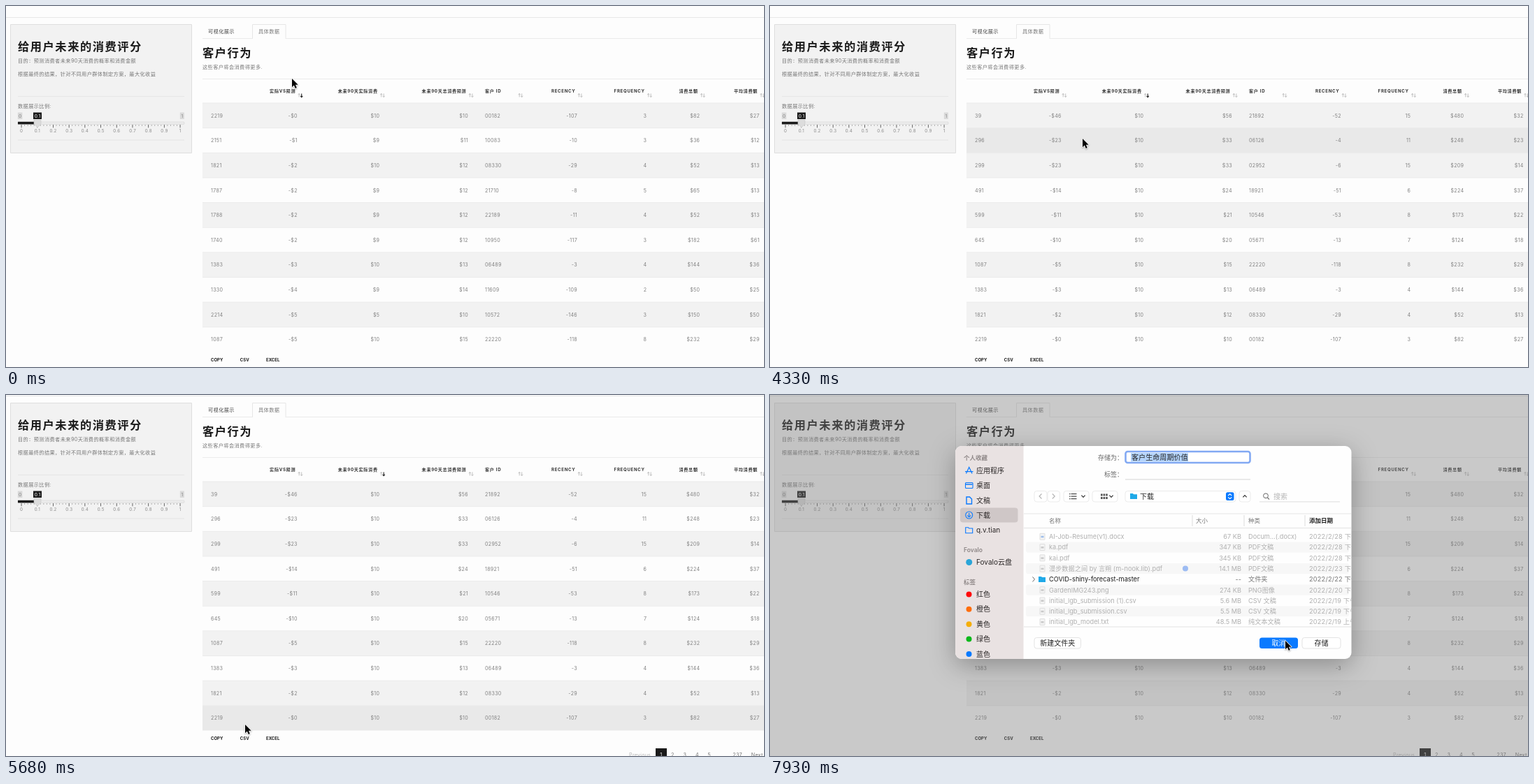
Write an HTML page with a canvas that moves like this. It is 1084 px wide and 517 px high and loops after 8000 ms.

```html
<!DOCTYPE html>
<html lang="zh-CN">
<head>
<meta charset="utf-8">
<title>客户行为</title>
<style>
html, body { margin: 0; width: 100%; height: 100%; overflow: hidden; background: #fdfdfd; }
canvas { display: block; width: 1084px; height: 517px; }
</style>
</head>
<body>
<canvas id="stage"></canvas>
<script>
const W = 1084, H = 517, LOOP = 8000;
const FONT = 'Inter, "Noto Sans CJK SC", "Noto Sans CJK", sans-serif';
const ratio = window.devicePixelRatio || 1;
const setup = c => {
  c.width = W * ratio;
  c.height = H * ratio;
  const x = c.getContext('2d');
  x.scale(ratio, ratio);
  return x;
};
const stage = document.getElementById('stage');
const layer = document.createElement('canvas');
const page = setup(stage), sheet = setup(layer);
let g = page;

// ---------- helpers ----------
function text(s, x, y, size, color, { w = 400, ls = 0, a = 'left' } = {}) {
  g.font = `${w} ${size}px ${FONT}`;
  g.letterSpacing = ls + 'px';
  g.textAlign = a;
  g.fillStyle = color;
  g.fillText(s, x + (a === 'right' ? ls : a === 'center' ? ls / 2 : 0), y + size * 0.36);
}
function rect(x, y, w, h, color) {
  g.fillStyle = color;
  g.fillRect(x, y, w, h);
}
function box(x, y, w, h, r, fill, stroke, lw = 1) {
  g.beginPath();
  g.roundRect(x, y, w, h, r);
  if (fill) { g.fillStyle = fill; g.fill(); }
  if (stroke) { g.strokeStyle = stroke; g.lineWidth = lw; g.stroke(); }
}
function line(color, lw, ...p) {
  g.beginPath();
  for (let i = 0; i < p.length; i += 2) g.lineTo(p[i], p[i + 1]);
  g.strokeStyle = color;
  g.lineWidth = lw;
  g.stroke();
}
function dot(x, y, r, fill, stroke, lw = 1) {
  g.beginPath();
  g.arc(x, y, r, 0, 7);
  if (fill) { g.fillStyle = fill; g.fill(); }
  if (stroke) { g.strokeStyle = stroke; g.lineWidth = lw; g.stroke(); }
}
const at = (keys, t) => keys.filter(k => k[0] <= t).pop();

// ---------- table data: id, gap, spent, forecast, customer, recency, frequency, total ----------
const parse = s => s.trim().split('\n').map(r => r.trim().split(' '));
const byGap = parse(`
  2219 0 10 10 00182 -107 3 82
  2151 1 9 11 10083 -10 3 36
  1821 2 10 12 08330 -29 4 52
  1787 2 9 12 21710 -8 5 65
  1788 2 9 12 22189 -11 4 52
  1740 2 9 12 10950 -117 3 182
  1383 3 10 13 06489 -3 4 144
  1330 4 9 14 11609 -109 2 50
  2214 5 5 10 10572 -146 3 150
  1087 5 10 15 22220 -118 8 232`);
const lowest = parse(`
  237 07323 -10 22 827
  148 18866 -1 8 469
  117 02356 -79 11 448
  117 04159 -4 36 932
  112 12056 -8 14 539
  109 06833 -20 6 474
  108 14229 -26 23 697
  101 11341 -19 15 711
  96 17477 -27 14 728
  95 04272 -10 10 553`).map(([gap, ...rest], i) => [i + 1, gap, 0, gap, ...rest]);
const bySpent = parse(`
  39 46 10 56 21892 -52 15 480
  296 23 10 33 06126 -4 11 248
  299 23 10 33 02952 -6 15 209
  491 14 10 24 18921 -51 6 224
  599 11 10 21 10546 -53 8 173
  645 10 10 20 05671 -13 7 124`).concat([9, 6, 2, 0].map(i => byGap[i]));

const HEADS = ['实际VS预测', '未来90天实际消费', '未来90天总消费预测', '客户 ID', 'RECENCY', 'FREQUENCY', '消费总额', '平均消费额'];
const WIDE = [416.5, 534, 660.7, 685, 816.7, 916, 992, 1077.3];
const TIGHT = [406, 525, 654, 678, 812.7, 913.3, 990.3, 1077.3];
const ROW = 35.65, TOP = 139;

// ---------- timeline: time, rows, columns, sorted column, direction ----------
const SORTS = [
  [0, byGap, WIDE, 0, 1], [1040, lowest, TIGHT, 0, -1],
  [2680, lowest, TIGHT, 1, -1], [3130, bySpent, WIDE, 1, 1]
];
const SCROLL = [[0, 0], [4780, 7], [4930, 17], [5080, 18], [5230, 18], [5380, 16], [5530, 15]];
// time, x, y, hand
const MOUSE = [
  [0, 409, 104], [150, 402, 111], [300, 400, 124, 1], [450, 420, 128, 1],
  [1340, 430, 128, 1], [1490, 462, 128, 1], [1640, 498, 128, 1], [1790, 516, 128, 1],
  [2230, 520, 128, 1], [2380, 525, 129, 1], [2530, 528, 130, 1], [2830, 529, 130, 1],
  [3280, 530, 129, 1], [3430, 530, 127, 1], [3580, 530, 125, 1], [3730, 530, 123, 1],
  [4030, 518, 141], [4180, 477, 168], [4330, 447, 190], [4930, 446, 193],
  [5080, 446, 196], [5230, 434, 236], [5380, 398, 340], [5530, 358, 440], [5680, 342, 472],
  [5830, 341, 485, 1], [5980, 341, 489, 1], [6130, 342, 490, 1], [6280, 343, 488, 1],
  [6430, 353, 468], [6580, 384, 420], [6730, 398, 397],
  [6880, 455, 381], [7030, 540, 366], [7180, 622, 357], [7330, 690, 353],
  [7480, 722, 352], [7630, 734, 352], [7780, 737, 352]
];
// time, opacity, offset, dimming
const SHEET = [[0, 0, 0, 0], [6730, 0.36, -24, 0.2], [6880, 0.85, -6, 0.7], [7030, 1, 0, 1]];

// ---------- dashboard ----------
function sidebar() {
  box(6.5, 26.5, 259, 184, 0, '#f2f2f2', '#dedede');
  text('给用户未来的消费评分', 17, 58, 16.3, '#1a1a1a', { w: 700, ls: 1.5 });
  const p = (s, y) => text(s, 17, y, 7.2, '#777', { ls: 0.4 });
  p('目的：预测消费者未来90天消费的概率和消费金额', 78);
  p('根据最终的结果，针对不同用户群体制定方案，最大化收益', 97);
  p('数据展示比例:', 143.5);
  rect(17, 129, 238, 1, '#e6e6e6');
  rect(17, 191.5, 238, 1, '#e6e6e6');

  const tag = (s, x, w, bg, fg) => {
    rect(x, 152.5, w, 9.5, bg);
    text(s, x + w / 2, 157.3, 6.6, fg, { a: 'center', ls: 0.2 });
  };
  tag('0', 16.8, 6.6, '#d9d9d9', '#888');
  tag('1', 248.8, 6, '#d9d9d9', '#888');
  tag('0.1', 39, 12, '#1a1a1a', '#fff');

  box(17, 166, 238, 3.4, 1, '#ececec', '#d4d4d4', 0.6);
  rect(17, 165.8, 25, 3.6, '#1a1a1a');
  for (let i = 0; i <= 50; i++) {
    const major = i % 5 === 0, x = 22 + i * 4.54;
    rect(x - 0.4, 170, 0.9, major ? 4.3 : 2, major ? '#555' : '#aaa');
    if (major) text(String(i / 50), x, 179, 6.2, '#8a8a8a', { a: 'center', ls: 0.3 });
  }
  g.beginPath();
  g.moveTo(40, 163);
  g.lineTo(50, 163);
  g.lineTo(50, 169);
  g.lineTo(45, 174);
  g.lineTo(40, 169);
  g.closePath();
  g.fillStyle = '#dcdcdc';
  g.fill();
  g.strokeStyle = '#c8c8c8';
  g.lineWidth = 0.6;
  g.stroke();
}

function sortIcon(x, y, dir) {
  const arrow = (cx, d, on) => {
    const c = on ? '#222' : '#b4b4b4', lw = on ? 1.1 : 0.8;
    line(c, lw, cx, y - 2.6, cx, y + 2.4);
    line(c, lw, cx - 1.6, y + d * 0.8, cx, y + d * 2.6, cx + 1.6, y + d * 0.8);
  };
  arrow(x - 1.8, -1, dir === -1);
  arrow(x + 1.7, 1, dir === 1);
}

function table([, rows, cols, sorted, dir], hover) {
  rect(281, 104, 803, 1, '#ececec');
  HEADS.forEach((h, i) => {
    const left = i === 3;
    text(h, cols[i] - (left ? 0 : 3), 121.5, 6.1, '#333', { w: 700, ls: 0.7, a: left ? 'left' : 'right' });
    sortIcon(left ? cols[i] + 51 : cols[i] + 4.5, 128, i === sorted ? dir : 0);
  });
  rows.forEach((r, i) => {
    const y = TOP + i * ROW, mid = y + 18;
    if (i === hover) rect(281, y, 803, ROW, '#e9e9e9');
    else if (i % 2 === 0) rect(281, y, 803, ROW, '#f2f2f2');
    rect(281, y - 0.5, 803, 1, '#ebebeb');
    const [id, gap, spent, forecast, who, rec, freq, total] = r;
    const avg = Math.round(total / freq - 0.01);
    text(String(id), 293, mid, 7.1, '#808080', { ls: 0.3 });
    ['-$' + gap, '$' + spent, '$' + forecast, who, rec, freq, '$' + total, '$' + avg].forEach((v, k) =>
      text(v, cols[k], mid, 7.1, '#808080', { ls: 0.3, a: k === 3 ? 'left' : 'right' }));
  });
}

function dashboard(t, mouse, scroll) {
  rect(0, 0, W, H, '#fdfdfd');
  g.save();
  g.translate(0, -scroll);
  rect(0, 16, W, 1, '#e8e8e8');
  sidebar();

  rect(281, 46, 803, 1, '#ebebeb');
  box(352.5, 26.5, 47.5, 20, 0, '#fdfdfd', '#e6e6e6');
  rect(353, 45.5, 46.5, 2, '#fdfdfd');
  text('可视化展示', 289, 36.5, 7.2, '#444', { ls: 0.4 });
  text('具体数据', 361, 36.5, 7.2, '#777', { ls: 0.4 });
  text('客户行为', 281, 67.5, 16.3, '#1a1a1a', { w: 700, ls: 1.5 });
  text('这些客户将会消费得更多.', 281, 87.5, 7.2, '#777', { ls: 0.4 });

  const [, mx, my, hand] = mouse;
  const inside = mx > 281 && !hand && t < 6730;
  table(at(SORTS, t), inside ? Math.floor((my + scroll - TOP) / ROW) : -1);

  if (t >= 5830 && t < 6880) rect(321, 494, 40, 27.5, '#e6e6e6');
  [['COPY', 301.7], ['CSV', 341.2], ['EXCEL', 381.7]].forEach(([s, x]) =>
    text(s, x, 507.3, 6, '#1a1a1a', { w: 700, a: 'center' }));

  rect(929, 521, 16, 19, '#1a1a1a');
  const pager = (s, x, c = '#777') => text(s, x, 530.5, 7.2, c, { a: 'center', ls: 0.2 });
  pager('Previous', 906.5, '#b8b8b8');
  pager('1', 936.7, '#fff');
  ['2', '3', '4', '5'].forEach((s, i) => pager(s, 953.2 + i * 17.5));
  pager('…', 1023.5, '#aaa');
  pager('237', 1046);
  pager('Next', 1074);
  g.restore();
}

// ---------- save sheet ----------
const BLUE = '#0a7aff';
function folder(x, y, fill, stroke) {
  g.beginPath();
  g.moveTo(x - 5, y - 4);
  g.lineTo(x - 1, y - 4);
  g.lineTo(x, y - 2.8);
  g.lineTo(x + 5, y - 2.8);
  g.lineTo(x + 5, y + 4);
  g.lineTo(x - 5, y + 4);
  g.closePath();
  if (fill) { g.fillStyle = fill; g.fill(); }
  if (stroke) { g.strokeStyle = stroke; g.lineWidth = 1.1; g.stroke(); }
}
const chevron = (x, y, dx, dy, c = '#333', lw = 1.2) => dx
  ? line(c, lw, x - dx, y - 3.5, x + dx, y, x - dx, y + 3.5)
  : line(c, lw, x - 2.6, y - dy, x, y + dy, x + 2.6, y - dy);

function places() {
  rect(265, 73, 97.5, 305, '#e9e2e2');
  box(272, 161.5, 82.5, 21, 4, '#cfc7c7');
  [['个人收藏', 90], ['Fovalo', 222], ['标签', 267.5]].forEach(([s, y]) =>
    text(s, 277, y, 8.5, '#8f8888', { w: 600 }));
  [['应用程序', 108], ['桌面', 129.5], ['文稿', 151], ['下载', 172.3], ['q.v.tian', 193.8], ['Fovalo云盘', 239.5]]
    .forEach(([s, y]) => text(s, 295, y, 10, '#2b2727'));

  line(BLUE, 1.2, 280.5, 112.5, 284.7, 103.5, 289, 112.5);
  line(BLUE, 1.2, 279, 109.7, 290.5, 109.7);
  box(279.5, 125.5, 10.5, 8, 1, null, BLUE, 1.1);
  line(BLUE, 1.4, 280, 128, 289.5, 128);
  g.beginPath();
  g.moveTo(281, 146);
  g.lineTo(285.5, 146);
  g.lineTo(288.5, 149);
  g.lineTo(288.5, 156);
  g.lineTo(281, 156);
  g.closePath();
  g.strokeStyle = BLUE;
  g.stroke();
  dot(284.7, 172, 5, null, BLUE, 1.1);
  line(BLUE, 1.1, 284.7, 169, 284.7, 175);
  chevron(284.7, 173.6, 0, 1.2, BLUE, 1.1);
  folder(284.7, 193.8, null, BLUE);
  dot(284.7, 239.5, 4.5, '#2aa5d8');

  [['红色', '#ff0a0a'], ['橙色', '#ff6d0a'], ['黄色', '#f5ae0a'], ['绿色', '#0cb81c'], ['蓝色', BLUE]]
    .forEach(([s, c], i) => {
      const y = 285.5 + i * 21.35;
      dot(284.5, y, 4, c);
      text(s, 295, y, 10, '#2b2727');
    });
}

const FILES = [
  ['AI-Job-Resume(v1).docx', '67 KB', 'Docum…(.docx)', '28'],
  ['ka.pdf', '347 KB', 'PDF文稿', '28'],
  ['kai.pdf', '345 KB', 'PDF文稿', '28'],
  ['漫步数据之间 by 言朔 (m-nook.lib).pdf', '14.1 MB', 'PDF文稿', '23'],
  ['COVID-shiny-forecast-master', '--', '文件夹', '22'],
  ['GardenIMG243.png', '274 KB', 'PNG图像', '20'],
  ['initial_lgb_submission (1).csv', '5.6 MB', 'CSV 文稿', '19'],
  ['initial_lgb_submission.csv', '5.5 MB', 'CSV 文稿', '19'],
  ['initial_lgb_model.txt', '48.5 MB', '纯文本文稿', '19']
];
function fileList() {
  rect(363, 169.5, 468, 1, '#e8e8e8');
  rect(363, 190, 468, 1, '#e4e4e4');
  [604, 678, 765].forEach(x => rect(x - 0.5, 172, 1, 16, '#dcdcdc'));
  [['名称', 399], ['大小', 609], ['种类', 684]].forEach(([s, x]) => text(s, x, 180, 8.5, '#777'));
  text('添加日期', 771, 180, 8.5, '#222', { w: 600 });
  FILES.forEach(([name, size, kind, day], i) => {
    const y = 202.8 + i * 15.28, dir = i === 4;
    const c = dir ? '#1c1c1c' : '#b0b0b0', c2 = dir ? '#777' : '#b0b0b0';
    if (i % 2) box(366, y - 7.6, 462, 15.2, 3, '#f7f7f7');
    if (dir) {
      chevron(377, y, 1.5, 0, '#666', 1);
      folder(389, y, '#1fa9e8');
    } else {
      box(386, y - 4.5, 7, 9, 0.5, '#f4f4f4', '#d4d4d4', 0.7);
      rect(387.5, y - 1, 4, 2.5, i === 0 ? '#9dbdea' : '#c9c9c9');
    }
    text(name, 399, y, 9.2, c);
    text(size, 674, y, 9.2, c2, { a: 'right' });
    text(kind, 684, y, 9.2, c2);
    text(`2022/2/${day} ${i === 8 ? '上' : '下'}午`, 771, y, 9.2, c2, { ls: 0.2 });
  });
  dot(594, 248.5, 4, '#9dbcf3');
  rect(363, 331.5, 468, 1, '#e4e4e4');
}

function button(s, x, w, on) {
  box(x, 347.5, w, 15.5, 3.5, on ? BLUE : '#fff', on ? null : '#dcdcdc', 0.8);
  text(s, x + w / 2, 355, 10, on ? '#fff' : '#222', { a: 'center' });
}

function saveSheet(pressed) {
  g.clearRect(0, 0, W, H);
  g.save();
  g.beginPath();
  g.roundRect(265, 73, 566.5, 305, 9);
  g.clip();
  rect(265, 73, 567, 305, '#fefefe');
  places();

  text('存储为：', 505, 89.5, 9, '#666', { a: 'right' });
  text('标签：', 505, 114, 9, '#666', { a: 'right' });
  box(508.5, 81, 178, 16, 3, '#fff', '#82a9f3', 2.6);
  rect(516, 83, 82, 12.5, '#b4d4fc');
  text('客户生命周期价值', 517, 89.3, 10.1, '#222');
  rect(508, 120.5, 179, 0.9, '#cfcfcf');

  const frame = (x, w) => box(x, 137.5, w, 15.5, 3.5, '#fff', '#e6e6e6', 0.8);
  frame(378, 18);
  frame(397, 17.5);
  chevron(386.8, 145, -1.7, 0, '#b5b5b5');
  chevron(405.5, 145, 1.7, 0, '#b5b5b5');
  frame(420, 36);
  frame(461, 36);
  for (let i = -1; i < 2; i++) {
    rect(428, 144.5 + i * 3.5, 1.5, 1.3, '#444');
    rect(430.5, 144.5 + i * 3.5, 8, 1.2, '#444');
    for (let k = 0; k < 2; k++) rect(473 + (i + 1) * 3.6, 141.5 + k * 4.5, 2.6, 3, '#555');
  }
  chevron(448, 145, 0, 1.4);
  chevron(488, 145, 0, 1.4);
  frame(508, 158);
  folder(520, 145, '#1fa9e8');
  text('下载', 529, 145, 10, '#222');
  box(652, 139.3, 11.5, 11.8, 2.5, BLUE);
  chevron(657.7, 142.9, 0, -1.1, '#fff');
  chevron(657.7, 147.5, 0, 1.1, '#fff');
  frame(671, 16);
  chevron(679, 145, 0, -1.4);
  rect(700, 152.5, 115, 0.9, '#dadada');
  dot(709, 144.3, 3.4, null, '#666', 1);
  line('#666', 1.1, 711.5, 147, 714, 149.6);
  text('搜索', 720, 145, 10, '#b5b5b5');

  fileList();
  button('新建文件夹', 378, 66.5, false);
  button('取消', 700, 55, pressed);
  button('存储', 761, 55, !pressed);
  g.restore();
}

// ---------- pointer ----------
const ARROW = new Path2D('M0 0V12.2L2.8 9.6L4.8 14L6.8 13.1L4.9 8.8H8.7Z');
const HAND = new Path2D('M-1.2 .8Q0 -.6 1.2 .8V5L2.4 4.6Q3.4 4.6 3.6 5.5Q5 4.8 5.6 6Q7.3 5.6 7.4 7.2V9.8Q7.2 11.4 6.2 12.4V14H-.6V12.6Q-2.2 11 -4 8.2Q-4 6.6 -2.6 7L-1.2 8.4Z');
function pointer([, x, y, hand]) {
  g.save();
  g.translate(x, y);
  g.shadowColor = 'rgba(0,0,0,.3)';
  g.shadowBlur = 2 * ratio;
  g.shadowOffsetY = ratio;
  g.lineJoin = 'round';
  g.strokeStyle = hand ? '#111' : '#fff';
  g.lineWidth = hand ? 1.1 : 1.6;
  g.stroke(hand ? HAND : ARROW);
  g.shadowColor = 'transparent';
  g.fillStyle = hand ? '#fff' : '#000';
  g.fill(hand ? HAND : ARROW);
  if (hand) {
    g.stroke(HAND);
    [1.1, 3, 4.9].forEach(k => line('#111', 0.7, k, 9, k, 12));
  }
  g.restore();
}

function render(t) {
  g = page;
  const mouse = at(MOUSE, t);
  dashboard(t, mouse, at(SCROLL, t)[1]);
  const [, alpha, dy, dim] = at(SHEET, t);
  if (alpha) {
    rect(0, 0, W, H, `rgba(122,122,122,${0.4 * dim})`);
    g = sheet;
    saveSheet(t >= 7930);
    g = page;
    g.save();
    g.globalAlpha = alpha;
    g.shadowColor = 'rgba(0,0,0,.3)';
    g.shadowBlur = 36 * ratio;
    g.shadowOffsetY = 9 * ratio;
    g.drawImage(layer, 0, dy, W, H);
    g.restore();
  }
  pointer(mouse);
}

const start = performance.now();
function tick() {
  render((performance.now() - start) % LOOP);
  requestAnimationFrame(tick);
}
tick();
</script>
</body>
</html>
```
